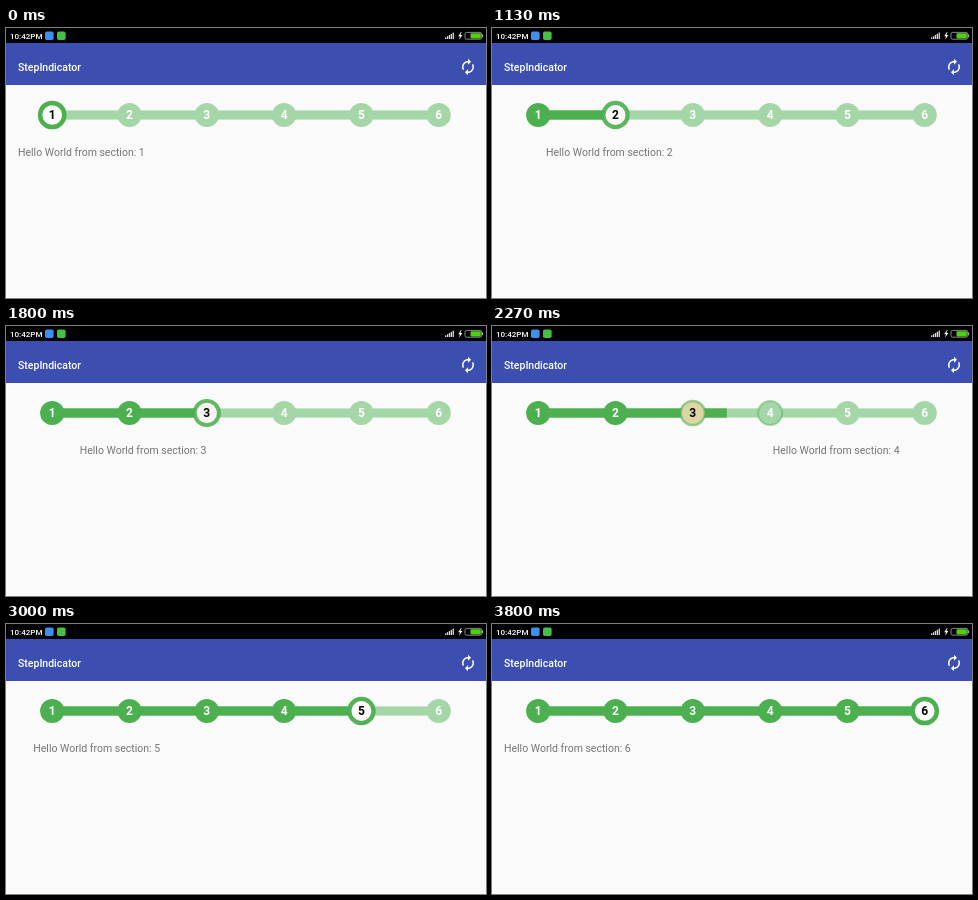
Write an HTML page with a canvas that moves like this. It is 480x270 px and loops after 3.99 s.

```html
<!DOCTYPE html>
<html lang="en">
<head>
<meta charset="utf-8">
<title>StepIndicator</title>
<style>
  html, body { margin: 0; width: 100%; height: 100%; overflow: hidden; background: #fafafa; }
  canvas { display: block; width: 480px; height: 270px; }
</style>
</head>
<body>
<canvas id="stage"></canvas>
<script>
const W = 480, H = 270, LOOP = 3990, FPS = 15;
const STEPS = 6, X0 = 46.2, GAP = 77.3, CY = 87, RADIUS = 12.1, RING = 4.5, LINE = 9.2;
const GREEN = '#4caf50', PALE = '#a5d6a7';
const HSV_WHITE = [0, 0, 1], HSV_GREEN = [122, 0.566, 0.686], HSV_PALE = [122, 0.229, 0.839];

// One swipe per page: finger drag, then a quintic settle. Times in ticks of 1/15 s.
const swipes = [
  { start: 13, from: 0.18,   release: 15,   at: 0.45, settle: 6.5,  end: 20 },
  { start: 23, from: 0.0125, release: 25.3, at: 0.38, settle: 6.3,  end: 30 },
  { start: 33, from: 0.29,   release: 34.4, at: 0.5,  settle: 4.5,  end: 38 },
  { start: 42, from: 0.15,   release: 42.9, at: 0.38, settle: 4.69, end: 47 },
  { start: 51, from: 0.05,   release: 52,   at: 0.2,  settle: 7,    end: 57 }
];

const canvas = document.getElementById('stage');
const ctx = canvas.getContext('2d');
const dpr = window.devicePixelRatio || 1;
canvas.width = W * dpr;
canvas.height = H * dpr;

const refresh = new Path2D('M12 6v3l4-4-4-4v3c-4.42 0-8 3.58-8 8 0 1.57.46 3.03 1.24 4.26L6.7 14.8c-.45-.83-.7-1.79-.7-2.8 0-3.31 2.69-6 6-6zm6.76 1.74L17.3 9.2c.44.84.7 1.79.7 2.8 0 3.31-2.69 6-6 6v-3l-4 4 4 4v-3c4.42 0 8-3.58 8-8 0-1.57-.46-3.03-1.24-4.26z');
const bolt = new Path2D('M455 4L452.2 8.3H454L453 11.8L456.4 7.1H454.4L455.6 4Z');

const stepX = i => X0 + i * GAP;

function rect(x, y, w, h, color) {
  ctx.fillStyle = color;
  ctx.fillRect(x, y, w, h);
}

function rounded(x, y, w, h, r, color) {
  ctx.fillStyle = color;
  ctx.beginPath();
  ctx.roundRect(x, y, w, h, r);
  ctx.fill();
}

function text(str, x, y, size, weight, color, align = 'left') {
  ctx.font = `${weight} ${size}px Roboto, sans-serif`;
  ctx.textAlign = align;
  ctx.fillStyle = color;
  ctx.fillText(str, x, y);
}

function disc(x, color) {
  ctx.fillStyle = color;
  ctx.beginPath();
  ctx.arc(x, CY, RADIUS, 0, Math.PI * 2);
  ctx.fill();
}

function ring(x, amount) {
  if (amount <= 0) return;
  ctx.globalAlpha = amount;
  ctx.strokeStyle = GREEN;
  ctx.lineWidth = RING * amount;
  ctx.beginPath();
  ctx.arc(x, CY, RADIUS, 0, Math.PI * 2);
  ctx.stroke();
  ctx.globalAlpha = 1;
}

function mixHsv(a, b, k) {
  const [h, s, v] = a.map((n, i) => n + (b[i] - n) * k);
  const channel = n => {
    const m = (n + h / 60) % 6;
    return Math.round(255 * (v - v * s * Math.max(0, Math.min(m, 4 - m, 1))));
  };
  return `rgb(${channel(5)}, ${channel(3)}, ${channel(1)})`;
}

// page: left page, p: share scrolled to the next, dragging: finger still down
function scrollAt(tick) {
  for (let i = 0; i < swipes.length; i++) {
    const s = swipes[i];
    if (tick >= s.end) continue;
    if (tick < s.start) return { page: i, p: 0, dragging: false };
    if (tick < s.release) {
      const k = (tick - s.start) / (s.release - s.start);
      return { page: i, p: s.from + (s.at - s.from) * k, dragging: true };
    }
    const t = Math.min(1, (tick - s.release) / s.settle);
    return { page: i, p: 1 - (1 - s.at) * (1 - t) ** 5, dragging: false };
  }
  return { page: STEPS - 1, p: 0, dragging: false };
}

function drawBars() {
  rect(0, 0, W, 15, '#000');
  text('10:42PM', 4, 10.8, 8, 500, '#fff');
  rounded(39, 3.5, 8.6, 8.6, 1.8, '#3f8ff0');
  rounded(51, 3.5, 8.6, 8.6, 1.8, '#45bf45');
  for (let i = 0; i < 5; i++) {
    const h = 1.6 + i * 1.2;
    rect(439 + i * 1.9, 11 - h, 1.3, h, '#ddd');
  }
  ctx.fillStyle = '#fff';
  ctx.fill(bolt);
  ctx.strokeStyle = '#aaa';
  ctx.lineWidth = 0.8;
  ctx.beginPath();
  ctx.roundRect(459, 4.4, 16.6, 6.8, 1.6);
  ctx.stroke();
  rounded(464.5, 5.2, 10.3, 5.2, 0.8, '#4fd016');
  rect(476, 6.4, 1.1, 2.8, '#aaa');

  rect(0, 15, W, 42, '#3c4fb1');
  text('StepIndicator', 12, 43.2, 10.5, 500, '#fff');
  ctx.save();
  ctx.translate(453, 30);
  ctx.scale(0.75, 0.75);
  ctx.fillStyle = '#fff';
  ctx.fill(refresh);
  ctx.restore();
}

function drawSteps({ page, p, dragging }) {
  const settling = p > 0 && !dragging;
  const current = settling ? page + 1 : page;
  const reach = stepX(current + (dragging ? p : 0));
  rect(X0, CY - LINE / 2, GAP * (STEPS - 1), LINE, PALE);
  rect(X0, CY - LINE / 2, reach - X0, LINE, GREEN);

  for (let i = 0; i < STEPS; i++) {
    const x = stepX(i);
    if (i < current) {
      disc(x, GREEN);
    } else if (i > current) {
      disc(x, PALE);
      if (dragging && i === current + 1) ring(x, p);
    } else {
      disc(x, settling ? mixHsv(HSV_PALE, HSV_WHITE, p) : mixHsv(HSV_WHITE, HSV_GREEN, p));
      ring(x, settling ? p : 1 - p);
    }
    text(i + 1, x, CY + 4.3, 12, 700, i === current ? '#000' : '#fff', 'center');
  }
}

function drawPages({ page, p }) {
  for (let i = page; i <= page + 1 && i < STEPS; i++) {
    text(`Hello World from section: ${i + 1}`, 12 + (i - page - p) * W, 128.3, 10.5, 400, '#757575');
  }
}

function draw(ms) {
  const scroll = scrollAt(Math.floor((ms + 5) * FPS / 1000));
  ctx.setTransform(dpr, 0, 0, dpr, 0, 0);
  rect(0, 0, W, H, '#fafafa');
  drawBars();
  drawSteps(scroll);
  drawPages(scroll);
}

const begin = performance.now();
function loop() {
  draw((performance.now() - begin) % LOOP);
  requestAnimationFrame(loop);
}
loop();
</script>
</body>
</html>
```
